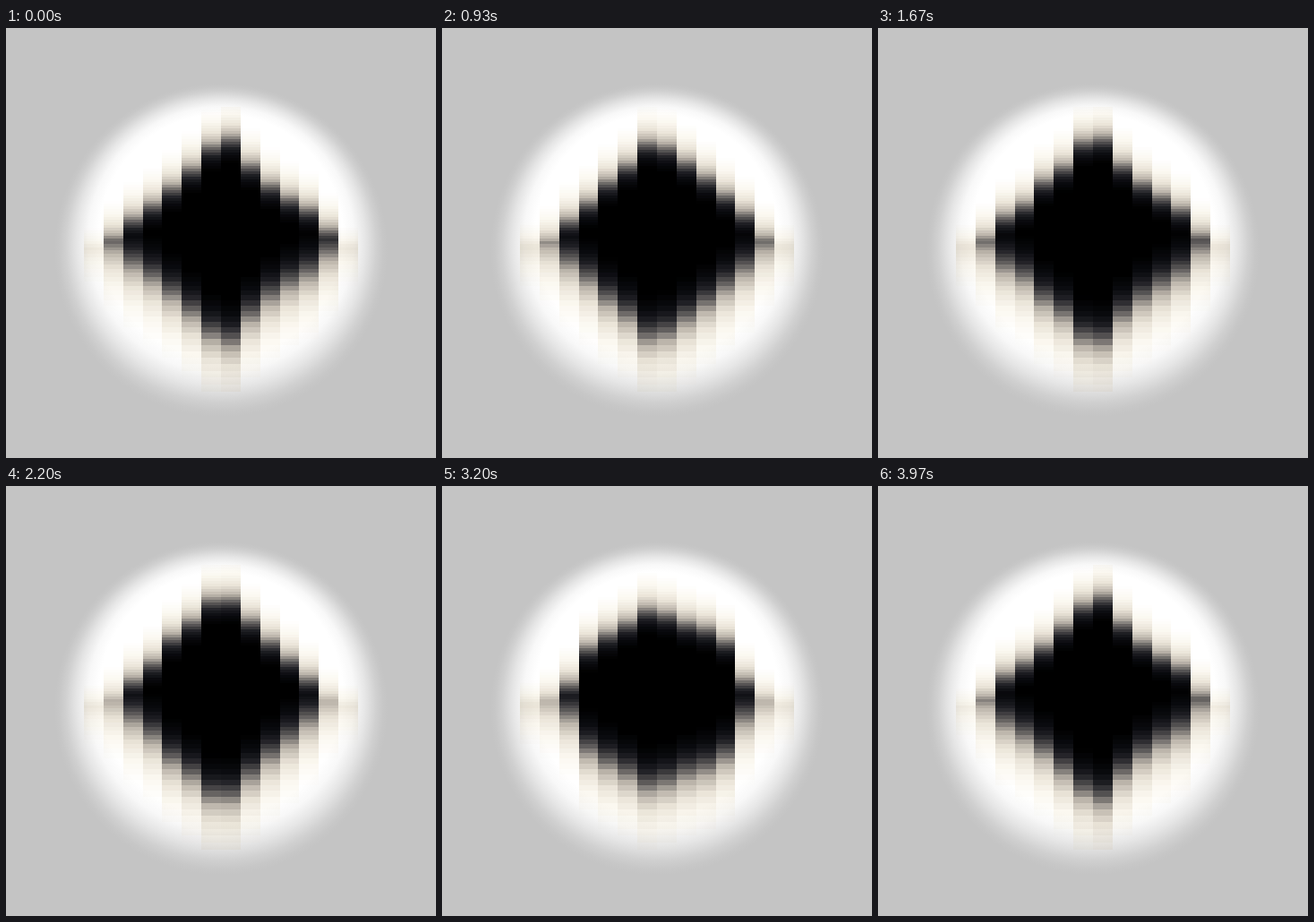
These frames come from a looping animation (480x480 px, 4.01 s). An HTML page with a canvas:

```html
<!DOCTYPE html>
<html lang="en">
<head>
<meta charset="utf-8">
<title>Pulsing columns</title>
<style>
html, body { margin: 0; width: 100%; height: 100%; overflow: hidden; background: #c4c4c4; }
canvas { display: block; width: 480px; height: 480px; }
</style>
</head>
<body>
<canvas id="stage" width="480" height="480"></canvas>
<script>
const ctx = document.getElementById('stage').getContext('2d');
const LOOP = 4010, STEPS = 120, COLS = 14, MID = 238;

// Half-height of the dark core in each column, by time in ms.
const poses = [
  [0,    [-30, 0, 22, 38, 57, 78, 103, 112, 82, 60, 45, 33, 9, -28]],
  [570,  [-25, -2, 21, 35, 58, 78, 114, 108, 81, 62, 45, 31, 7, -25]],
  [1270, [-24, -10, 19, 46, 70, 86, 98, 95, 90, 75, 53, 24, -10, -26]],
  [1670, [-25, -1, 25, 38, 64, 80, 108, 112, 82, 62, 47, 33, 3, -25]],
  [2200, [-29, -9, 18, 38, 66, 84, 108, 109, 85, 62, 42, 20, -10, -29]],
  [3200, [-24, -10, 14, 55, 70, 82, 97, 92, 82, 76, 62, 18, -10, -27]],
  [3970, [-33, -4, 24, 38, 56, 78, 102, 112, 82, 60, 45, 33, 1, -31]]
];

// Ink colour by depth inside the edge.
const ramp = [
  [-45, 255, 255, 255], [-30, 251, 248, 240], [-18, 234, 228, 216],
  [-8, 188, 181, 171], [0, 98, 95, 94], [8, 32, 32, 37],
  [15, 10, 11, 15], [25, 0, 0, 0]
];

const mix = (a, b, k) => a + (b - a) * k;

function ink(depth) {
  const d = Math.max(-45, Math.min(25, depth));
  let i = 1;
  while (i < ramp.length - 1 && ramp[i][0] < d) i++;
  const a = ramp[i - 1], b = ramp[i], k = (d - a[0]) / (b[0] - a[0]);
  return `rgb(${[1, 2, 3].map(c => Math.round(mix(a[c], b[c], k))).join()})`;
}

function heights(t) {
  let i = poses.length - 1;
  while (poses[i][0] > t) i--;
  const [start, from] = poses[i];
  const [end, to] = poses[i + 1] || [LOOP, poses[0][1]];
  const k = (1 - Math.cos(Math.PI * (t - start) / (end - start))) / 2;
  return from.map((h, c) => mix(h, to[c], k));
}

// Thin bands above the middle, widening bands below it.
const bands = [];
for (let y = 88; y < MID; y += 3) bands.push([y, y + 3]);
const lower = k => Math.round(MID + 3.2 * k + 0.08 * k * k);
for (let k = 0; lower(k) < 405; k++) bands.push([lower(k), lower(k + 1)]);

const glow = ctx.createRadialGradient(240, 232, 136, 240, 248, 186);
[[0, 255], [0.25, 248], [0.5, 230], [0.75, 208], [0.9, 199], [1, 196]]
  .forEach(([at, v]) => glow.addColorStop(at, `rgb(${v},${v},${v})`));

const edge = i => Math.round(240 + (i - COLS / 2) * 21.85);

function draw(t) {
  ctx.globalCompositeOperation = 'source-over';
  ctx.fillStyle = '#c4c4c4';
  ctx.fillRect(0, 0, 480, 480);
  ctx.fillStyle = glow;
  ctx.fillRect(0, 0, 480, 480);
  ctx.globalCompositeOperation = 'multiply';
  heights(t).forEach((h, c) => {
    const x = edge(c), w = edge(c + 1) - x;
    for (const [y0, y1] of bands) {
      const y = (y0 + y1) / 2;
      const depth = Math.min(y - (MID - h), (MID + h * 0.97 - y) / 1.7);
      if (depth <= -45) continue;
      ctx.fillStyle = ink(depth);
      ctx.fillRect(x, y0, w, y1 - y0);
    }
  });
}

const origin = performance.now();
function tick() {
  const t = (performance.now() - origin) % LOOP;
  draw(Math.floor(t / LOOP * STEPS) * LOOP / STEPS);
  requestAnimationFrame(tick);
}
tick();
</script>
</body>
</html>
```
